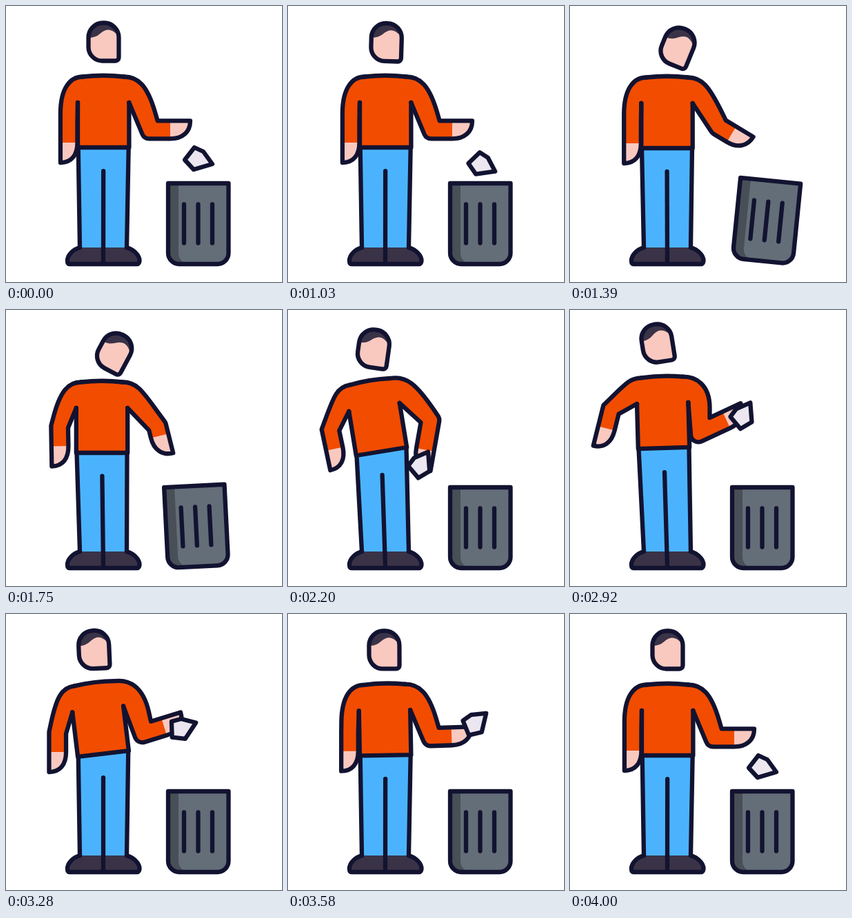
Recreate the animation shown at these times as an HTML page with a canvas. Size 400 px wide and 400 px high, loop 4030 ms.

```html
<!DOCTYPE html>
<html lang="en">
<head>
<meta charset="utf-8">
<title>Throwing litter in a bin</title>
<style>
html, body { margin: 0; width: 100%; height: 100%; overflow: hidden; background: #fff; }
canvas { display: block; width: 400px; height: 400px; }
</style>
</head>
<body>
<canvas id="stage" width="400" height="400"></canvas>
<script>
const c = document.getElementById('stage').getContext('2d');
const LOOP = 4030, HOLD = 1030, STEP = 30, GRAB = 2110, THROW = 3280;
const INK = '#121331', SHIRT = '#f24c00', SKIN = '#f9c9c0', JEANS = '#4bb3fd',
      DARK = '#3a3347', METAL = '#646e78', SHADE = '#484f56', PAPER = '#ebe6ef';

// head and body: x, y, tilt. Arms: upper swing, forearm angle, reach. Zero hangs down.
const REST  = { head: [141.5, 52, 0],   body: [141.2, 205, 0],    left: [0, 0],     right: [-30, -90, 57] };
const LOOK  = { head: [162, 61.5, 31],  body: [139, 207, 0],      left: [27, -1],   right: [-66, -14, 43] };
const GRASP = { head: [124, 56, 8],     body: [135.5, 205, -9.3], left: [46, -12],  right: [-53, 10, 72] };
const WIND  = { head: [126.5, 48, -9],  body: [136, 200, -1.6],   left: [85, 14],   right: [2, -115, 70] };
const TOSS  = { head: [127.5, 51.5, -2.5], body: [141, 202.5, -6.9], left: [29, 0], right: [-16, -107, 59] };

const LEFT_ARM  = { side: -1, joint: [-50, -60], length: 25, width: 12.3, round: 0 };
const RIGHT_ARM = { side: 1, joint: [55, -49.5], length: 27.6, width: 13, round: 11 };

// Smooth monotone interpolation through keyed vectors
function track(t, times, keys) {
  const last = times.length - 1;
  if (t <= times[0]) return keys[0];
  if (t >= times[last]) return keys[last];
  const i = times.findIndex(x => x > t) - 1;
  const h = times[i + 1] - times[i], u = (t - times[i]) / h, v = 1 - u;
  return keys[i].map((a, j) => {
    const slope = k => k < 0 || k >= last ? 0
      : (keys[k + 1][j] - keys[k][j]) / (times[k + 1] - times[k]);
    const tangent = k => {
      const p = slope(k - 1), q = slope(k);
      return p * q > 0 ? 2 * p * q / (p + q) : 0;
    };
    return a * v * v * (1 + 2 * u) + keys[i + 1][j] * u * u * (3 - 2 * u)
      + h * u * v * (v * tangent(i) - u * tangent(i + 1));
  });
}

function pose(t, part, start = HOLD, arrive = 1750) {
  return track(t, [start, arrive, 2140, 2200, 2800, 3060, THROW, 3680],
    [REST, LOOK, GRASP, GRASP, WIND, WIND, TOSS, REST].map(p => p[part]));
}

const rad = degrees => degrees * Math.PI / 180;
const mix = (a, b, u) => [a[0] + (b[0] - a[0]) * u, a[1] + (b[1] - a[1]) * u];

// Step from p along a limb hanging at the given angle, and sideways across it
function go(p, angle, along, across = 0) {
  const s = Math.sin(rad(angle)), k = Math.cos(rad(angle));
  return [p[0] - s * along + k * across, p[1] + k * along + s * across];
}

function paint(path, fill, stroke = true) {
  if (fill) { c.fillStyle = fill; c.fill(path); }
  if (stroke) c.stroke(path);
}

function line(...pts) {
  const p = new Path2D();
  pts.forEach(q => p.lineTo(...q));
  return p;
}

function placed(x, y, degrees, draw) {
  c.save();
  c.translate(x, y);
  c.rotate(rad(degrees));
  draw();
  c.restore();
}

function drawHead(t) {
  placed(...pose(t, 'head', 930, 1640), () => {
    const face = new Path2D();
    face.roundRect(-22, -27.5, 44, 55, [21, 21, 5, 20]);
    paint(face, SKIN, false);
    c.save();
    c.clip(face);
    paint(new Path2D('M-22-6C-8-6-6-13 1-16C8-20 15-16 22-8V-40H-22Z'), DARK, false);
    c.restore();
    paint(face);
  });
}

function drawLegs(hip, tilt) {
  const hipL = go(hip, tilt, 0, -36.5), hipR = go(hip, tilt, 0, 36.5), shoe = [141, 371];
  paint(line(hipL, hipR, [175, 350], [107, 350]), JEANS, false);
  paint(new Path2D('M107 350C97 353 89 361 89 369C89 372 90 374 92 374H190C192 374 193.5 372 193.5 369C193.5 361 185 353 175 350'), DARK);
  paint(line(hipL, [107, 350]));
  paint(line(hipR, [175, 350]));
  paint(line(mix(hip, shoe, .205), shoe));
}

function elbowOf({ joint, length }, hip, tilt, swing) {
  return go(go(hip, tilt, joint[1], joint[0]), tilt + swing, length);
}

// Outline from shoulder round the hand to the armpit, and the bare hand
function arm(rig, hip, tilt, [swing, fore, reach = 57]) {
  const { side, width, round } = rig;
  const elbow = elbowOf(rig, hip, tilt, swing);
  const upper = .55 * (tilt + swing), bend = fore - upper;
  const miter = side * width / Math.cos(rad(bend / 2));
  const outer = go(elbow, upper + bend / 2, 0, miter);
  const inner = go(elbow, upper + bend / 2, 0, -miter);
  const tip = go(elbow, fore, reach, side * width);
  const cuff = go(elbow, fore, reach - 29, side * width);
  const wrist = go(elbow, fore, reach - 29, -side * width);
  const palm = [...go(tip, fore, 0, -side * 16), ...go(wrist, fore, 18), ...wrist];
  const shoulder = go(hip, tilt, -102.5, side * 30);
  const sleeve = go(outer, upper, -14);
  const d = Math.hypot(sleeve[0] - shoulder[0], sleeve[1] - shoulder[1]);

  const outline = line(shoulder);
  outline.bezierCurveTo(...go(shoulder, tilt, 0, side * .3 * d), ...go(sleeve, upper, -.58 * d), ...sleeve);
  outline.arcTo(...outer, ...tip, side * bend > 0 ? round : 0);
  outline.lineTo(...tip);
  outline.bezierCurveTo(...palm);
  const pit = go(hip, tilt, -65, side * 37.2);
  outline.arcTo(...inner, ...pit, side * bend < 0 ? round : 0);
  outline.lineTo(...pit);

  const hand = line(cuff, tip);
  hand.bezierCurveTo(...palm);
  return { outline, hand };
}

function drawShirt(t, hip, tilt) {
  const at = (x, y) => go(hip, tilt, y, x);
  const arms = [
    arm(LEFT_ARM, hip, tilt, pose(t, 'left', 1440)),
    arm(RIGHT_ARM, hip, tilt, pose(t, 'right'))
  ];
  for (const { outline, hand } of arms) {
    const sleeve = new Path2D(outline);
    sleeve.lineTo(...at(0, -80));
    paint(sleeve, SHIRT, false);
    paint(hand, SKIN, false);
  }
  const sides = [at(-37.2, -65), at(-37.2, 0), at(37.2, 0), at(37.2, -65)];
  const neck = line(at(-30, -102.5));
  neck.quadraticCurveTo(...at(0, -106), ...at(30, -102.5));
  const torso = new Path2D(neck);
  [...sides].reverse().forEach(q => torso.lineTo(...q));
  paint(torso, SHIRT, false);
  paint(neck);
  paint(line(...sides));
  arms.forEach(a => paint(a.outline));
}

function drawPaper(t, hip, tilt) {
  let x, y, turn;
  if (t >= GRAB && t < THROW) {
    const [swing, fore, reach] = pose(t, 'right');
    [x, y] = go(elbowOf(RIGHT_ARM, hip, tilt, swing), fore, reach - 6, -4);
    turn = -78 + 38 * Math.max(0, (t - 3060) / (THROW - 3060)) ** 2;
  } else {
    // m counts steps of free flight left until the resting place
    const m = t < HOLD ? 0 : ((t < GRAB ? 1000 : 4000) - t) / STEP;
    x = 278 - (m > 0 ? 24 * (m / 24) ** 2 : 2.5 * m);
    y = 221 - 7.5 * m + .215 * m * m;
    turn = -8 * m + .264 * m * m;
    if (y > 320) return;
  }
  placed(x, y, turn, () => paint(new Path2D('M-5-16L8-10L21 8L-6 16L-19 2Z'), PAPER));
}

function drawBin(t) {
  // Rocks from one bottom corner to the other until it settles
  const u = (t - 1190) / 920;
  const tilt = u > 0 && u < 1 ? 7.4 * (1 - u) * Math.sin(u * 2.5 * Math.PI) : 0;
  const pivot = tilt > 0 ? 322 : 235;
  placed(pivot, 374, tilt, () => {
    c.translate(-pivot, -374);
    const can = new Path2D('M235 257H322.5V358a16 16 0 0 1-16 16H251a16 16 0 0 1-16-16Z');
    paint(can, METAL, false);
    paint(new Path2D('M235 257H250V358a16 16 0 0 0 16 16H251a16 16 0 0 1-16-16Z'), SHADE, false);
    paint(can);
    for (const x of [258, 278.5, 299]) paint(line([x, 287.5], [x, 343.5]));
  });
}

function draw(now) {
  const ms = now % LOOP;
  const t = ms < HOLD ? 0 : HOLD + Math.floor((ms - HOLD) / STEP) * STEP;
  c.clearRect(0, 0, 400, 400);
  c.strokeStyle = INK;
  c.lineWidth = 6.3;
  c.lineCap = c.lineJoin = 'round';
  const [x, y, tilt] = pose(t, 'body');
  drawLegs([x, y], tilt);
  drawShirt(t, [x, y], tilt);
  drawHead(t);
  drawPaper(t, [x, y], tilt);
  drawBin(t);
}

const begin = performance.now();
function frame() {
  draw(performance.now() - begin);
  requestAnimationFrame(frame);
}
frame();
</script>
</body>
</html>
```
